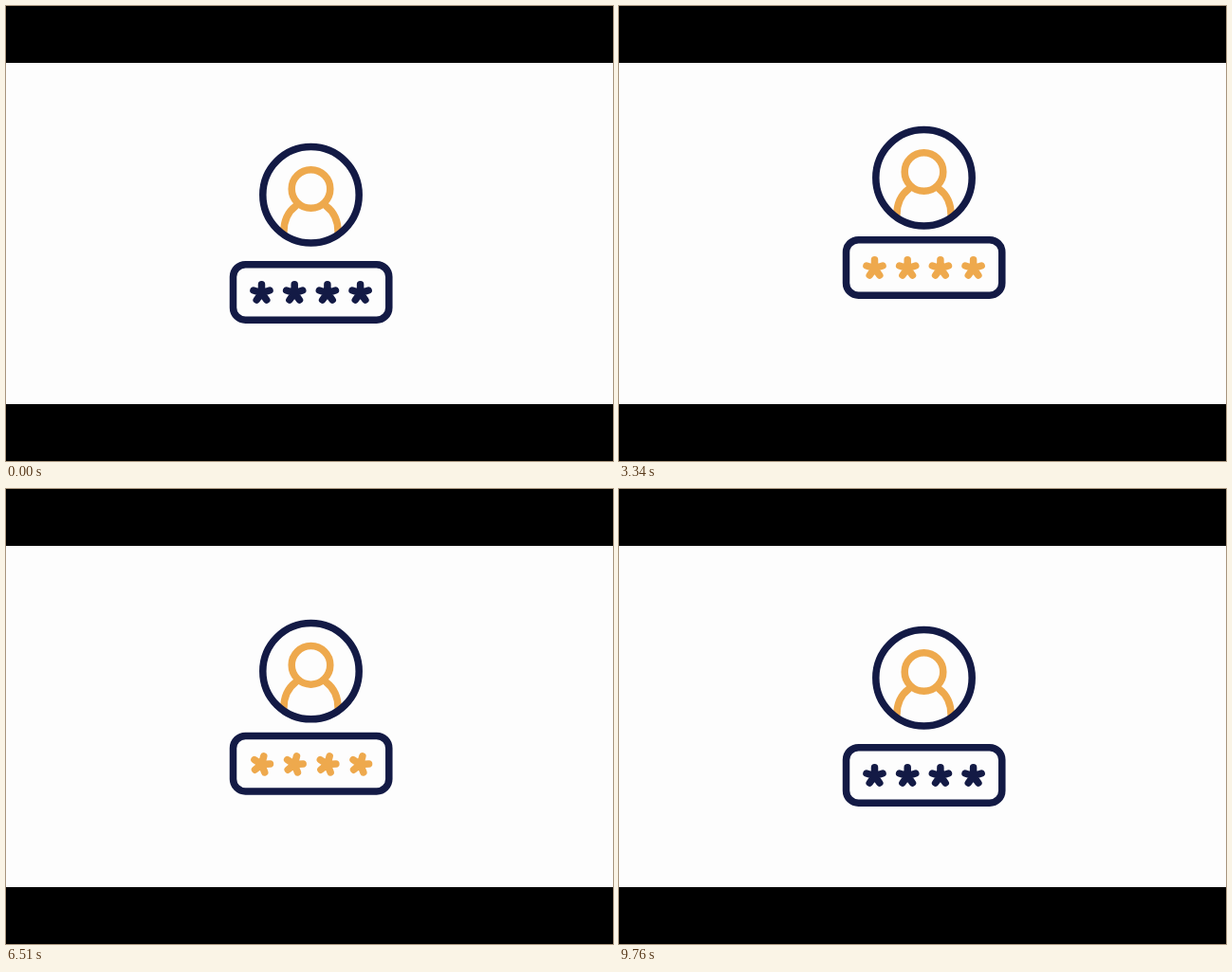
An HTML page that plays this animation: 640 by 480 pixels, repeating every 9800 ms.

```html
<!DOCTYPE html>
<html lang="en">
<head>
<meta charset="utf-8">
<title>Login icon</title>
<style>
  html, body { margin: 0; width: 100%; height: 100%; overflow: hidden; background: #000; }
  svg { display: block; width: 640px; height: 480px; }
  g { fill: none; stroke-width: 7.5; stroke-linecap: round; }
  .dark { stroke: #131a45; }
  .orange { stroke: #eea94d; }
</style>
</head>
<body>
<svg viewBox="0 0 640 480">
  <rect y="60" width="640" height="360" fill="#fdfdfd"/>
  <g id="avatar">
    <g class="orange">
      <path d="M292.9 238.5C292.9 227 297.5 217 305.5 211M350.1 238.5C350.1 227 345.5 217 337.5 211"/>
      <circle cx="321.5" cy="193" r="20.3"/>
    </g>
    <circle class="dark" cx="321.5" cy="199.3" r="50.7"/>
  </g>
  <g id="field">
    <rect class="dark" x="239.5" y="272.7" width="164.3" height="58.5" rx="13"/>
  </g>
</svg>
<script>
const PERIOD = 2450;
const avatar = document.getElementById('avatar');
const field = document.getElementById('field');

// Five spokes from the centre, the first pointing up
const spokes = [0, 1, 2, 3, 4].map(i => {
  const a = i * Math.PI * 0.4;
  return `M0 0L${(9 * Math.sin(a)).toFixed(2)} ${(-9 * Math.cos(a)).toFixed(2)}`;
}).join('');

const stars = [0, 1, 2, 3].map(() => {
  const star = document.createElementNS('http://www.w3.org/2000/svg', 'path');
  star.setAttribute('d', spokes);
  return field.appendChild(star);
});

const progress = (t, start, end) => Math.min(1, Math.max(0, (t - start) / (end - start)));
const ease = x => x < 0.5 ? 4 * x ** 3 : 1 - 4 * (1 - x) ** 3;
const moved = (t, start, end) => ease(progress(t, start, end));
const lift = (el, y) => el.setAttribute('transform', `translate(0 ${-y})`);

function draw(now) {
  const t = now % PERIOD;
  lift(avatar, 18 * (moved(t, 20, 790) - moved(t, 940, 2190)));
  lift(field, 26 * (moved(t, 75, 800) - moved(t, 1020, 2180)));

  const back = progress(t, 1420, 1980);
  stars.forEach((star, i) => {
    const start = 124 + i * 124;
    const spin = progress(t, start, start + 311);
    const angle = 360 * (ease(spin) - ease(back));
    star.setAttribute('transform', `translate(${269.5 + i * 34.7} 302.8) rotate(${angle})`);
    star.setAttribute('class', spin > 0.42 && back < 0.5 ? 'orange' : 'dark');
  });
  requestAnimationFrame(() => draw(performance.now()));
}
draw(0);
</script>
</body>
</html>
```
